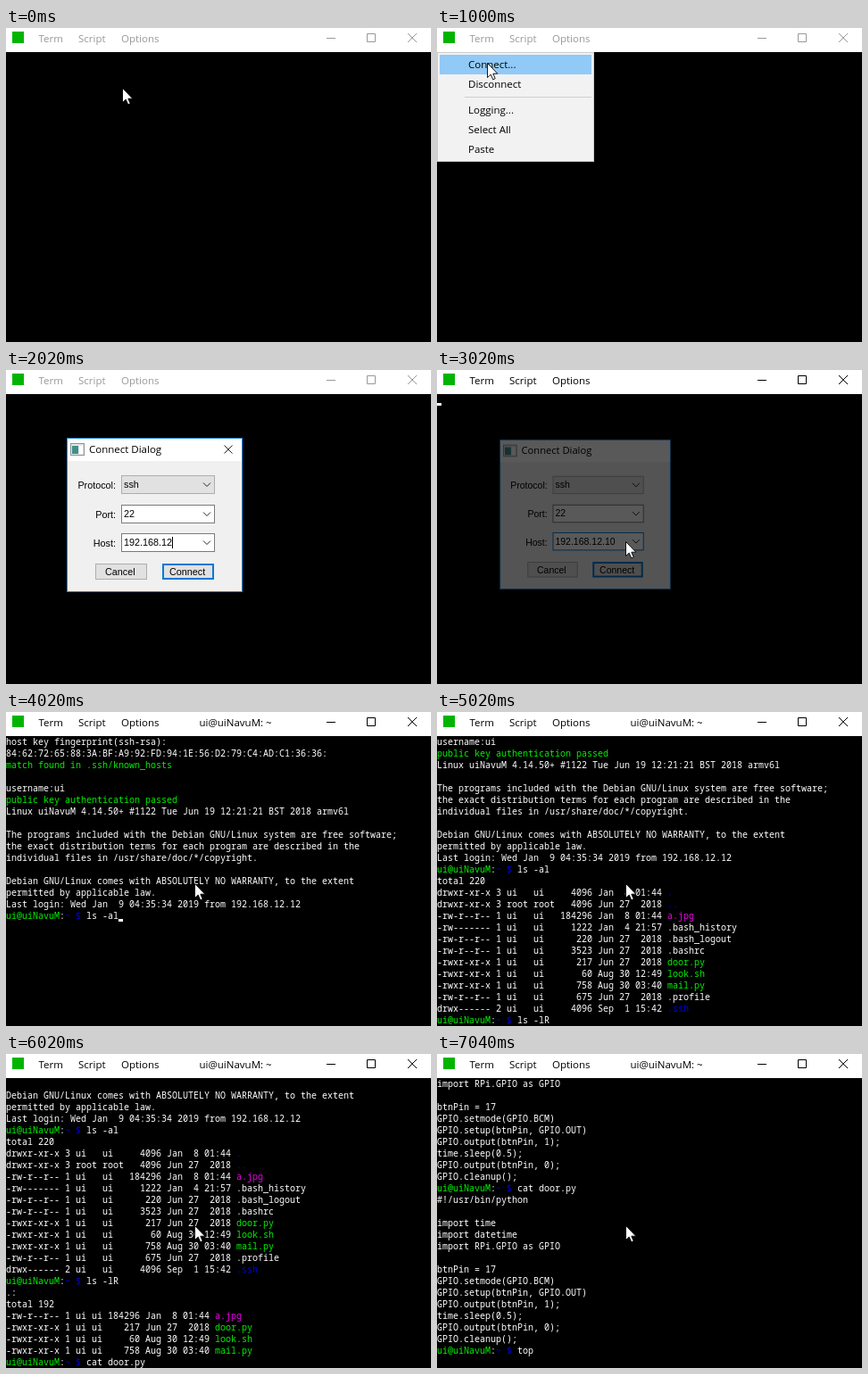
Animation, 476 px wide and 352 px high, one loop 8000 ms. Source, as an HTML page:

```html
<!DOCTYPE html>
<html lang="en">
<head>
<meta charset="utf-8">
<title>Terminal session</title>
<style>
  html, body { margin: 0; width: 100%; height: 100%; overflow: hidden; background: #000; }
  svg { display: block; width: 100vw; height: 100vh; }
  text { white-space: pre; }
  .ui { font: 11.5px "Open Sans", "Noto Sans", sans-serif; }
  .form { font: 10.8px "Liberation Sans", Arial, sans-serif; }
  .term { font: 10px "Noto Sans Mono", "DejaVu Sans Mono", monospace; }
  .line { fill: none; stroke: #222; }
</style>
</head>
<body>
<svg id="stage" viewBox="0 0 476 352"></svg>
<script>
const HOST = "uiNavuM", USER = "ui";
const PERIOD = 8000, ROW = 13, COL = 6, TOP = 27;
const COLORS = { w: "#fff", g: "#00f000", b: "#0000e0", m: "#e800e8" };

// ^x switches the colour of the text that follows
const prompt = cmd => `^g${USER}@${HOST}^w:^b~ $^w ${cmd}`;
const entry = (mode, links, size, date, name, owner = USER, width = 4) =>
  `${mode} ${links} ${owner.padEnd(width)} ${owner.padEnd(width)} ${String(size).padStart(6)} ${date} ${name}`;

const RW = "-rw-r--r--", RX = "-rwxr-xr-x", DIR = "drwxr-xr-x";
const files = width => [
  entry(RX, 1, 217, "Jun 27  2018", "^gdoor.py", USER, width),
  entry(RX, 1, 60, "Aug 30 12:49", "^glook.sh", USER, width),
  entry(RX, 1, 758, "Aug 30 03:40", "^gmail.py", USER, width)
];
const photo = width => entry(RW, 1, 184296, "Jan  8 01:44", "^ma.jpg", USER, width);
const script = [
  "#!/usr/bin/python", "",
  "import time", "import datetime", "import RPi.GPIO as GPIO", "",
  "btnPin = 17", "GPIO.setmode(GPIO.BCM)", "GPIO.setup(btnPin, GPIO.OUT)",
  "GPIO.output(btnPin, 1);", "time.sleep(0.5);", "GPIO.output(btnPin, 0);",
  "GPIO.cleanup();"
];
const lines = [
  "host key fingerprint(ssh-rsa):",
  "84:62:72:65:88:3A:BF:A9:92:FD:94:1E:56:D2:79:C4:AD:C1:36:36:",
  "^gmatch found in .ssh/known_hosts", "",
  `username:${USER}`,
  "^gpublic key authentication passed",
  `Linux ${HOST} 4.14.50+ #1122 Tue Jun 19 12:21:21 BST 2018 armv6l`, "",
  "The programs included with the Debian GNU/Linux system are free software;",
  "the exact distribution terms for each program are described in the",
  "individual files in /usr/share/doc/*/copyright.", "",
  "Debian GNU/Linux comes with ABSOLUTELY NO WARRANTY, to the extent",
  "permitted by applicable law.",
  "Last login: Wed Jan  9 04:35:34 2019 from 192.168.12.12",
  prompt("ls -al"),
  "total 220",
  entry(DIR, 3, 4096, "Jan  8 01:44", "^b."),
  entry(DIR, 3, 4096, "Jun 27  2018", "^b..", "root"),
  photo(4),
  entry("-rw-------", 1, 1222, "Jan  4 21:57", ".bash_history"),
  entry(RW, 1, 220, "Jun 27  2018", ".bash_logout"),
  entry(RW, 1, 3523, "Jun 27  2018", ".bashrc"),
  ...files(4),
  entry(RW, 1, 675, "Jun 27  2018", ".profile"),
  entry("drwx------", 2, 4096, "Sep  1 15:42", "^b.ssh"),
  prompt("ls -lR"),
  ".:", "total 192", photo(0), ...files(0),
  prompt("cat door.py"), ...script,
  prompt("cat door.py"), ...script,
  prompt("top")
];

// view: first and last visible line; caret: column and row
const REST = [211, 192];
const scenes = [
  { at: 0, mouse: [130, 67] },
  { at: 1000, mouse: [56, 39], menu: true },
  { at: 2020, dialog: "open" },
  { at: 3020, mouse: REST, dialog: "closing", active: true, caret: [0, 0] },
  { at: 4020, mouse: REST, active: true, titled: true, view: [0, 15], caret: [21, 15] },
  { at: 5020, mouse: REST, active: true, titled: true, view: [4, 28] },
  { at: 6020, mouse: REST, active: true, titled: true, view: [11, 35] },
  { at: 7040, mouse: REST, active: true, titled: true, view: [40, 63] }
];

const rect = (x, y, w, h, fill, more = "") =>
  `<rect x="${x}" y="${y}" width="${w}" height="${h}" fill="${fill}" ${more}/>`;
const box = (x, y, w, h, fill, stroke, id = "") =>
  rect(x + .5, y + .5, w - 1, h - 1, fill, `stroke="${stroke}" ${id && `id="${id}"`}`);
const text = (x, y, str, cls = "ui", more = "") =>
  `<text x="${x}" y="${y}" class="${cls}" ${more}>${str}</text>`;
const path = (d, more = 'class="line"') => `<path d="${d}" ${more}/>`;

function termLine(str, i) {
  let color = "w";
  const spans = str.split(/\^(\w)/).map((part, k) => {
    if (k % 2) { color = part; return ""; }
    return part && `<tspan fill="${COLORS[color]}">${part}</tspan>`;
  });
  return text(0, TOP + 10 + i * ROW, spans.join(""), "term");
}

function field(y, label, value, fill, stroke, id) {
  return text(123, y + 15, label, "form", 'text-anchor="end"') +
    box(129, y, 105, 21, fill, stroke, id && id + "Box") +
    text(132, y + 14, value, "form", id ? `id="${id}"` : "") +
    path(`M221 ${y + 8.5}l4 4 4-4`);
}

const dialog = box(68, 76, 197, 173, "#f0f0f0", "#1883d7") +
  rect(69, 77, 195, 25, "#fff") +
  box(72, 82, 16, 14, "#e4e8ea", "#8a9296") + rect(74, 85, 7, 9, "#3f8f8a") + rect(82, 85, 4, 9, "#fff") +
  text(93, 93, "Connect Dialog") +
  path("M244.5 84.5l9 9m0-9l-9 9", 'class="line" id="close"') +
  field(118, "Protocol:", "ssh", "#e1e1e1", "#adadad") +
  field(151, "Port:", "22", "#fff", "#7a7a7a") +
  field(183, "Host:", "", "#fff", "#7a7a7a", "host") +
  rect(186, 187, 1, 13, "#000", 'id="bar"') +
  box(100, 217, 58, 18, "#e1e1e1", "#adadad") + text(111, 230, "Cancel", "form") +
  rect(176, 218, 56, 16, "#e1e1e1", 'stroke="#0078d7" stroke-width="2"') + text(183, 230, "Connect", "form");

const menu = box(0, 27, 176, 123, "#f2f2f2", "#ccc") +
  rect(3, 30, 170, 22, "#91c9f7") +
  rect(31, 77, 142, 1, "#d0d0d0") +
  [["Connect...", 45], ["Disconnect", 67], ["Logging...", 96], ["Select All", 118], ["Paste", 140]]
    .map(([label, y]) => text(35, y, label)).join("");

const titleBar = rect(0, 0, 476, TOP, "#fff") +
  rect(7, 4, 13, 13, "#00b400") +
  `<g id="bartext">` +
  text(36.5, 16, "Term") + text(81, 16, "Script") + text(129, 16, "Options") +
  text(216.5, 16, `${USER}@${HOST}: ~`, "ui", 'id="title"') +
  path("M359 11.5h10M404.5 6.5h9v9h-9zM450 6l10 10m0-10l-10 10", 'id="controls" fill="none"') +
  `</g>`;

document.getElementById("stage").innerHTML =
  rect(0, 0, 476, 352, "#000") +
  `<g id="term">${lines.map(termLine).join("")}</g>` +
  rect(0, 0, 5, 3, "#fff", 'id="caret"') +
  titleBar +
  `<g id="menu">${menu}</g><g id="dialog">${dialog}</g>` +
  path("M.5.5V16.6L4.2 13.1 6.7 18.8 9.2 17.7 6.8 12.2H11.8Z",
    'id="mouse" fill="#fff" stroke="#000" stroke-width=".9"');

const $ = id => document.getElementById(id);
const show = (el, on) => el.setAttribute("visibility", on ? "inherit" : "hidden");
const place = (el, x, y) => el.setAttribute("transform", `translate(${x} ${y})`);
const rows = [...$("term").children];
let current;

function draw(scene) {
  const [first, last] = scene.view || [0, -1];
  rows.forEach((row, i) => show(row, i >= first && i <= last));
  place($("term"), 0, -first * ROW);

  show($("caret"), scene.caret);
  if (scene.caret) place($("caret"), scene.caret[0] * COL, TOP + 10 + scene.caret[1] * ROW);

  const ink = scene.active ? "#000" : "#999";
  $("bartext").setAttribute("fill", ink);
  $("controls").setAttribute("stroke", ink);
  show($("title"), scene.titled);
  show($("menu"), scene.menu);

  const closing = scene.dialog === "closing";
  show($("dialog"), scene.dialog);
  show($("bar"), scene.dialog === "open");
  show($("close"), scene.dialog === "open");
  $("dialog").setAttribute("opacity", closing ? .35 : 1);
  $("dialog").setAttribute("transform", closing ? "translate(166 162) scale(.973) translate(-166.5 -162.5)" : "");
  $("host").textContent = closing ? "192.168.12.10" : "192.168.12";
  $("hostBox").setAttribute("stroke", closing ? "#0078d7" : "#7a7a7a");

  show($("mouse"), scene.mouse);
  if (scene.mouse) place($("mouse"), ...scene.mouse);
}

function tick() {
  const t = performance.now() % PERIOD;
  const scene = scenes.filter(s => s.at <= t).pop();
  if (scene !== current) draw(current = scene);
  requestAnimationFrame(tick);
}
tick();
</script>
</body>
</html>
```
